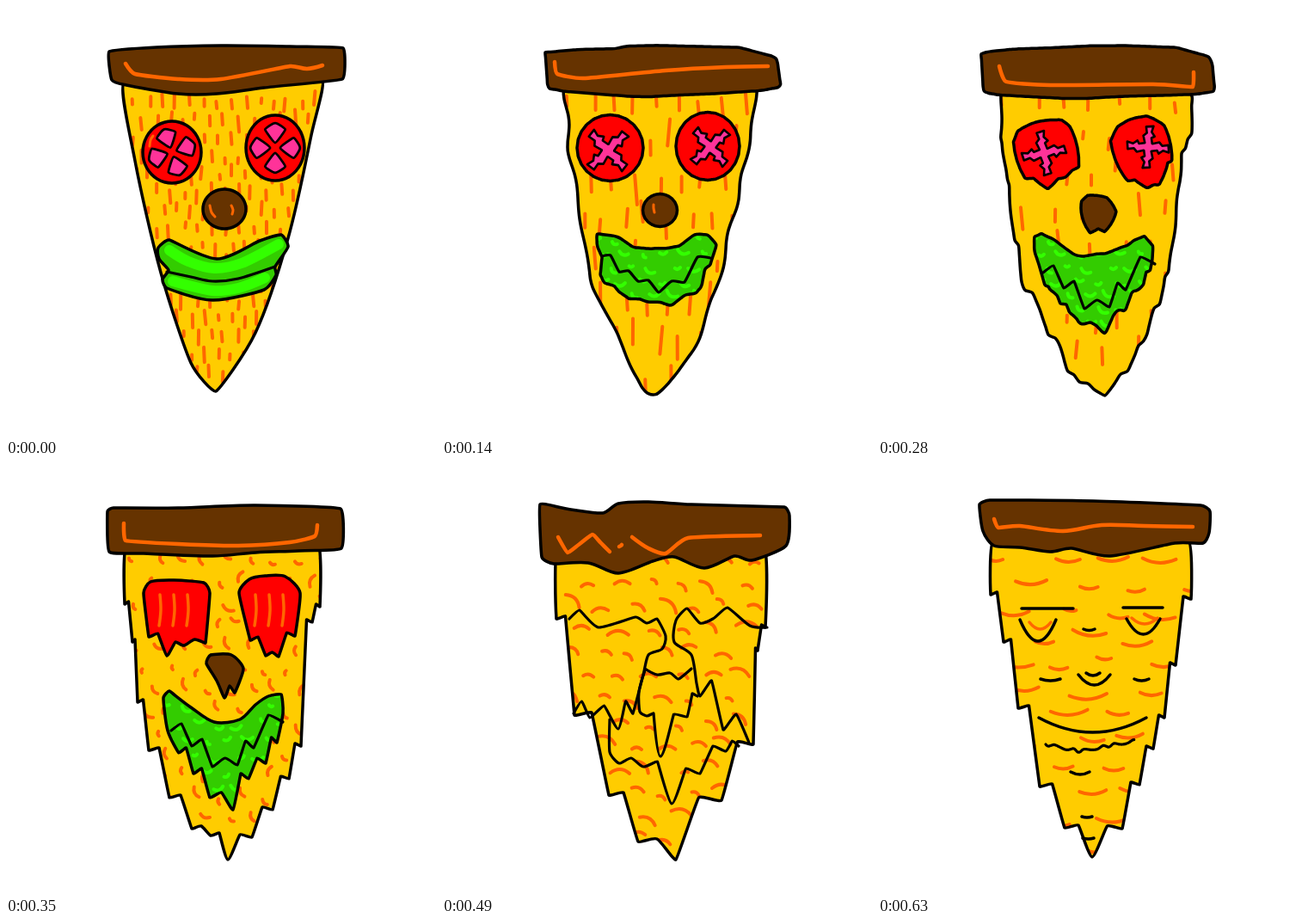
Write an HTML page with a canvas that moves like this. It is 500 px wide and 500 px high and loops after 700 ms.

```html
<!DOCTYPE html>
<html lang="en">
<head>
<meta charset="utf-8">
<title>Melting pizza</title>
<style>
html, body { margin: 0; width: 100%; height: 100%; overflow: hidden; background: #fff; }
canvas { display: block; width: 100vw; height: 100vh; }
</style>
</head>
<body>
<canvas id="c" width="500" height="500"></canvas>
<script>
const g = document.getElementById('c').getContext('2d');
const STEP = 70, INK = '#000', BROWN = '#663300', CHEESE = '#ffcc00', ORANGE = '#ff6600',
  RED = '#ff0000', PINK = '#ff3399', GREEN = '#33cc00', LIME = '#33ff00', BLUE = '#0099ff';
const DOWN = Math.PI / 2;

// ---- geometry: every outline is a list of [x, y] points ----
const pts = s => typeof s === 'string' ? s.split(' ').map(q => q.split(',').map(Number)) : s;
const mix = (a, b, t) => a + (b - a) * t;
const dist = (a, b) => Math.hypot(b[0] - a[0], b[1] - a[1]);

function oval(cx, cy, rx, ry) {
  return Array.from({ length: 24 }, (_, i) => {
    const a = Math.PI * (1 + i / 12);
    return [cx + rx * Math.cos(a), cy + ry * Math.sin(a)];
  });
}

// Drip tips with a valley raised by d between neighbours.
function hang(tips, d) {
  const p = pts(tips);
  return p.flatMap((a, i) => {
    const b = p[i + 1];
    return b ? [a, [(a[0] + b[0]) / 2, Math.min(a[1], b[1]) - d]] : [a];
  });
}
const drip = (top, tips, d) => [...pts(top), ...hang(tips, d)];

// Slice whose sides fall in ledges; each corner is the low end of a ledge.
function ledges(left, tip, right, lift = 3) {
  const end = pts(tip)[0];
  const side = s => {
    const p = pts(s);
    return [[p[0][0] + Math.sign(250 - p[0][0]) * 4, 88], ...p.flatMap((a, i) => {
      const b = p[i + 1] || end;
      return [a, [mix(a[0], b[0], .5), a[1] - lift]];
    })];
  };
  return [...side(left), end, ...side(right).reverse()];
}

function resample(s, n = 100, closed = true) {
  const p = pts(s), q = closed ? [...p, p[0]] : p, sum = [0];
  for (let i = 1; i < q.length; i++) sum.push(sum[i - 1] + dist(q[i - 1], q[i]));
  let j = 1;
  return Array.from({ length: n }, (_, i) => {
    const d = i / (closed ? n : n - 1) * sum[q.length - 1];
    while (j < q.length - 1 && sum[j] < d) j++;
    const t = (d - sum[j - 1]) / (sum[j] - sum[j - 1]);
    return [0, 1].map(k => mix(q[j - 1][k], q[j][k], t));
  });
}

// Wobble a path across its own direction.
function ripple(s, amp, waves, closed = true) {
  const p = resample(s, 90, closed), n = p.length;
  return p.map((v, i) => {
    const a = p[Math.max(0, i - 1)], b = p[Math.min(n - 1, i + 1)], l = dist(a, b) || 1;
    const w = amp * Math.sin(i / n * waves * 2 * Math.PI + Math.sin(i / 5));
    return [v[0] - (b[1] - a[1]) / l * w, v[1] + (b[0] - a[0]) / l * w];
  });
}

const blend = (a, b) => {
  const q = resample(b);
  return resample(a).map((v, i) => [mix(v[0], q[i][0], .5), mix(v[1], q[i][1], .5)]);
};

// ---- drawing ----
function trace(s, closed) {
  const p = pts(s), n = p.length;
  const at = i => closed ? p[(i + n) % n] : p[Math.max(0, Math.min(n - 1, i))];
  // Handles shrink at sharp turns and never outgrow the shorter neighbour.
  const handle = i => {
    const a = at(i - 1), b = at(i), c = at(i + 1), l = dist(a, b), m = dist(b, c), w = dist(a, c);
    if (!l || !m || !w) return [0, 0];
    const dot = ((b[0] - a[0]) * (c[0] - b[0]) + (b[1] - a[1]) * (c[1] - b[1])) / (l * m);
    const k = Math.min(l, m) * .36 * (.25 + .75 * Math.max(0, dot)) / w;
    return [(c[0] - a[0]) * k, (c[1] - a[1]) * k];
  };
  g.beginPath();
  g.moveTo(...p[0]);
  for (let i = 0; i < (closed ? n : n - 1); i++) {
    const b = at(i), c = at(i + 1), h = handle(i), e = handle(i + 1);
    g.bezierCurveTo(b[0] + h[0], b[1] + h[1], c[0] - e[0], c[1] - e[1], c[0], c[1]);
  }
  if (closed) g.closePath();
}

function stroke(color, w) { g.strokeStyle = color; g.lineWidth = w; g.stroke(); }
function line(s, color, w) { trace(s, false); stroke(color, w); }
function shape(s, fill, inside, w = 3.5) {
  trace(s, true);
  g.fillStyle = fill;
  g.fill();
  if (inside) {
    g.save();
    g.clip();
    inside();
    g.restore();
    trace(s, true);
  }
  stroke(INK, w);
}

// Short bowed strokes on a staggered, jittered grid.
function scatter([gx, gy, len, angle, spread, bow], color) {
  let seed = 11;
  const rnd = () => (seed = seed * 16807 % 2147483647) / 2147483647;
  for (let y = 112, row = 0; y < 445; y += gy, row++)
    for (let x = 150 + row % 2 * gx / 2; x < 368; x += gx) {
      const cx = x + (rnd() - .5) * gx * .4, cy = y + (rnd() - .5) * gy * .5;
      const a = angle + (rnd() - .5) * 2 * spread, l = len * (.4 + rnd() * .9);
      const dx = Math.cos(a) * l / 2, dy = Math.sin(a) * l / 2;
      g.beginPath();
      g.moveTo(cx - dx, cy - dy);
      g.quadraticCurveTo(cx - dy * bow * 4, cy + dx * bow * 4, cx + dx, cy + dy);
      stroke(color, 4);
    }
}

// Sagging creases: x, y, width, sag.
function creases(s, color) {
  for (const [x, y, w, sag] of pts(s)) {
    g.beginPath();
    g.moveTo(x, y);
    g.quadraticCurveTo(x + w / 2, y + sag, x + w, y);
    stroke(color, 3.5);
  }
}

// A pattern [angle, radius] repeated four times around a centre.
function spin(cx, cy, r, turn, polar) {
  return [0, 1, 2, 3].map(i => polar.map(([a, d]) => {
    const t = turn + a - i * DOWN;
    return [cx + Math.cos(t) * d * r, cy + Math.sin(t) * d * r];
  }));
}
const WEDGE = [[0, .16], [-.5, .66], [0, .78], [.5, .66]];
const ARM = [[.8, .25], [.3, .45], [.5, .58], [.18, .72], [.2, 1], [-.15, .95], [-.14, .66], [-.45, .57], [-.7, .25]];

function cross(spec) {
  g.beginPath();
  for (const q of spin(...spec, ARM).flat()) g.lineTo(...q);
  g.closePath();
  g.fillStyle = PINK;
  g.fill();
  stroke(INK, 2.6);
}

// ---- poses ----
const whole = {
  crust: '120,53 175,48 250,46 330,47 392,49 391,85 300,95 245,102 200,102 140,92 123,86',
  shine: ['139,67 150,79 200,85 250,85 330,70 350,73 368,69'],
  body: '138,88 150,180 180,310 215,415 244,448 290,380 328,270 355,150 367,86',
  marks: [16, 21, 14, DOWN, .1, 0],
  eyes: [oval(193, 170, 34, 36), oval(313, 165, 34, 38)],
  wedges: [[193, 170, 36, -1.9], [313, 165, 37, -DOWN]],
  nose: oval(254, 236, 25, 23),
  lips: '177,281 190,272 245,294 295,273 320,266 328,280 313,303 314,313 300,330 240,342 187,328 182,318 189,307 178,294',
  split: '187,309 215,315 240,320 270,317 313,303',
  glow: ['190,284 212,297 242,305 274,299 317,277', '194,320 240,331 270,328 301,316'],
  glowW: 12,
  glints: ['167,163 168,156 171,151', '237,232 239,240 243,245', '262,232 264,237 263,242']
};

const wavy = {
  crust: '118,51 200,53 215,48 270,49 391,51 395,88 320,97 240,103 190,99 121,93',
  shine: ['131,65 134,79 165,84 260,75 330,71 379,70'],
  body: ripple('139,88 148,165 160,230 174,320 200,390 239,457 285,390 314,325 341,215 357,155 366,88', 3, 13),
  marks: [25, 46, 27, DOWN, .1, 0],
  eyes: [oval(196, 164, 37, 38), oval(309, 162, 35, 39)],
  crosses: [[193, 168, 29, .78], [312, 164, 27, .82]],
  nose: oval(253, 236, 16, 17),
  lips: '186,293 179,265 205,268 238,286 256,284 290,264 320,268 310,292 308,318 265,336 205,332 181,312',
  split: '185,292 207,302 238,319 260,307 309,292',
  glow: ['190,275 235,300 260,296 303,276', '196,317 240,329 293,315'],
  glowW: 6,
  glints: ['246,231 246,235 247,240']
};

const soft = {
  crust: '122,57 160,49 250,43 345,46 388,70 393,100 370,106 270,107 220,109 145,104 125,98',
  shine: ['141,70 149,88 200,92 320,91 366,94 367,77'],
  body: ripple('146,88 148,170 162,260 172,325 208,375 232,445 248,455 288,435 318,360 345,240 370,88', 2, 15),
  marks: [33, 42, 20, DOWN, .12, 0],
  eyes: [oval(195, 166, 40, 39), oval(309, 164, 39, 40)],
  crosses: [[193, 171, 26, -.2], [314, 164, 25, .06]],
  nose: oval(254, 239, 24, 21),
  lips: drip('186,291 178,278 180,264 205,268 225,285 250,278 284,281 300,266 318,267 320,282', '312,314 292,346 265,362 237,354 215,348 188,325', 1),
  split: hang('186,291 206,309 228,320 252,333 282,321 312,293', 1),
  leaf: [24, 16, 11, .3, .6, .25]
};

const sag = {
  crust: '118,55 125,51 200,51 290,48 389,52 390,98 340,101 290,103 240,107 160,104 120,102',
  shine: ['137,69 139,89 200,93 270,95 330,91 359,84 362,71'],
  body: ledges('138,163 147,207 153,277 166,333 190,388 216,424 238,432', '258,460', '365,166 356,184 343,328 329,366 310,402 286,434'),
  marks: [27, 25, 11, 1.2, .9, .2],
  eyes: [drip('160,150 168,137 195,135 230,138 237,150', '232,208 207,211 187,223 166,201', 4),
    drip('271,150 283,134 302,130 325,131 342,150', '336,200 317,224 302,223 284,205', 4)],
  stripes: [195, 306],
  nose: drip('245,252 233,232 238,222 262,222 276,238', '266,266 254,272', 8),
  lips: drip('188,310 183,272 190,264 215,283 242,300 272,297 290,280 305,270 320,268 322,290', '315,324 302,348 282,366 264,402 237,388 218,360 201,336', 6),
  split: hang('192,310 216,328 240,352 269,350 288,330 322,300', 8),
  leaf: [24, 19, 11, .1, .7, .25]
};

const melt = {
  crust: drip('118,55 130,50 146,50 155,61 185,61 245,50 290,50 360,46 376,52 389,49 390,65 377,103', '360,107 335,111 310,114 287,118 262,138 240,114 215,110 180,108 150,105 122,100', 6),
  shine: [ripple('133,79 147,92 190,90 218,83 275,106 318,88 355,88 373,77', 2, 9, false)],
  body: ledges('139,168 153,264 156,318 178,362 197,409 233,460', '267,465', '378,152 367,190 361,266 350,318 337,382 303,411', 10),
  marks: [25, 26, 13, 1.5, .6, .15],
  eyeFill: ORANGE,
  eyes: [drip('164,200 160,158 168,146 190,160 226,150 236,172 234,195', '222,230 190,266 174,220', 16),
    drip('277,195 271,160 283,146 300,152 325,139 347,155 342,198 324,212', '317,277 297,238 285,212', 5)],
  nose: drip('248,252 233,237 240,231 250,237 264,230 273,240 264,252', '258,312', 0),
  lipFill: BLUE,
  lips: drip('187,302 180,280 187,275 210,302 245,312 285,310 318,280 332,277 330,295', '322,348 304,374 272,427 242,433 217,408 203,345', 12),
  split: hang('194,328 226,368 264,382 286,366 306,350 328,312', 14),
  leaf: [23, 26, 16, DOWN, .12, 0]
};

const goo = {
  crust: '114,47 150,53 187,57 205,46 240,44 290,47 398,50 404,60 400,95 360,112 340,107 305,121 270,108 245,113 205,127 170,115 130,116 116,108',
  shine: ['135,85 146,103 160,93 175,82 185,92 195,102', '206,96 208,95 209,94', '221,85 240,98 260,104 286,86 370,83'],
  body: ledges('133,180 154,292 194,385 228,439', '272,460', '376,190 367,217 362,326 325,391'),
  lines: [
    drip('148,180 160,170 182,190 225,178 238,185 250,180 260,200 256,215 240,222 234,245', '222,290 205,308 172,295 153,290', 14),
    drip('378,190 358,188 332,167 315,180 300,185 285,168 272,182 270,207 290,222 296,255', '300,270 327,309 357,324', 18),
    '236,238 250,245 265,243 275,250 290,238',
    drip('236,240 229,265 230,288', '238,293 254,340 285,294 297,270', 3),
    drip('195,297 195,335', '206,348 234,352 267,395 300,360 330,334 345,328', 6)
  ],
  marks: [36, 27, 19, .35, .45, -.2]
};

const settled = {
  crust: '118,47 130,42 250,43 375,48 386,55 385,80 378,92 345,92 270,107 225,98 200,102 165,97 135,95 122,78',
  shine: ['135,64 140,74 165,72 215,78 260,71 310,72 366,73'],
  body: ledges('131,152 146,207 163,284 188,375 217,423', '249,457', '364,157 346,234 333,295 320,331 304,373 284,424'),
  lines: [ripple('195,326 235,334 298,322', 1.5, 6, false)],
  marks: [62, 30, 34, .02, .1, .12],
  folds: '167,168,60,0 285,167,46,0 165,181,42,50 289,180,39,36 233,245,37,24 242,243,16,6 187,295,125,34 224,358,22,6 189,250,23,4 298,250,17,4 239,192,13,3 237,410,12,2 238,435,13,2',
  lids: '176,184,25,16 295,179,30,14'
};

function between(a, b, extra) {
  const out = { ...a };
  for (const k of ['crust', 'body', 'nose', 'lips']) if (a[k] && b[k]) out[k] = blend(a[k], b[k]);
  if (a.eyes && b.eyes) out.eyes = a.eyes.map((e, i) => blend(e, b.eyes[i]));
  return { ...out, ...extra };
}

const poses = [
  whole, wavy,
  between(wavy, soft, { split: soft.split, glow: null, leaf: soft.leaf }),
  soft,
  between(soft, sag, { split: sag.split }),
  sag, melt, goo,
  between(goo, settled, { lines: goo.lines.slice(0, 4) }),
  settled
];

function draw(p) {
  g.fillStyle = '#fff';
  g.fillRect(0, 0, 500, 500);
  g.lineCap = g.lineJoin = 'round';
  shape(p.body, CHEESE, () => scatter(p.marks, ORANGE));
  for (const e of p.eyes || []) shape(e, p.eyeFill || RED);
  for (const w of p.wedges || []) for (const q of spin(...w, WEDGE)) shape(q, PINK, null, 2.8);
  (p.crosses || []).forEach(cross);
  for (const x of p.stripes || [])
    for (const k of [-16, 0, 16]) line([[x + k, 152], [x + k + 1, 170], [x + k - 1, 188]], ORANGE, 3.5);
  if (p.lips) {
    shape(p.lips, p.lipFill || GREEN, () => {
      for (const s of p.glow || []) line(s, LIME, p.glowW);
      if (p.leaf) scatter(p.leaf, LIME);
    });
    line(p.split, INK, 3.2);
  }
  if (p.nose) shape(p.nose, BROWN);
  for (const s of p.lines || []) line(s, INK, 3.2);
  if (p.folds) creases(p.folds, INK);
  if (p.lids) creases(p.lids, ORANGE);
  for (const s of p.glints || []) line(s, ORANGE, 3);
  shape(p.crust, BROWN);
  for (const s of p.shine) line(s, ORANGE, 4.5);
}

const start = performance.now();
function tick() {
  const t = Math.max(0, performance.now() - start);
  draw(poses[Math.floor(t / STEP) % poses.length]);
  requestAnimationFrame(tick);
}
tick();
</script>
</body>
</html>
```
